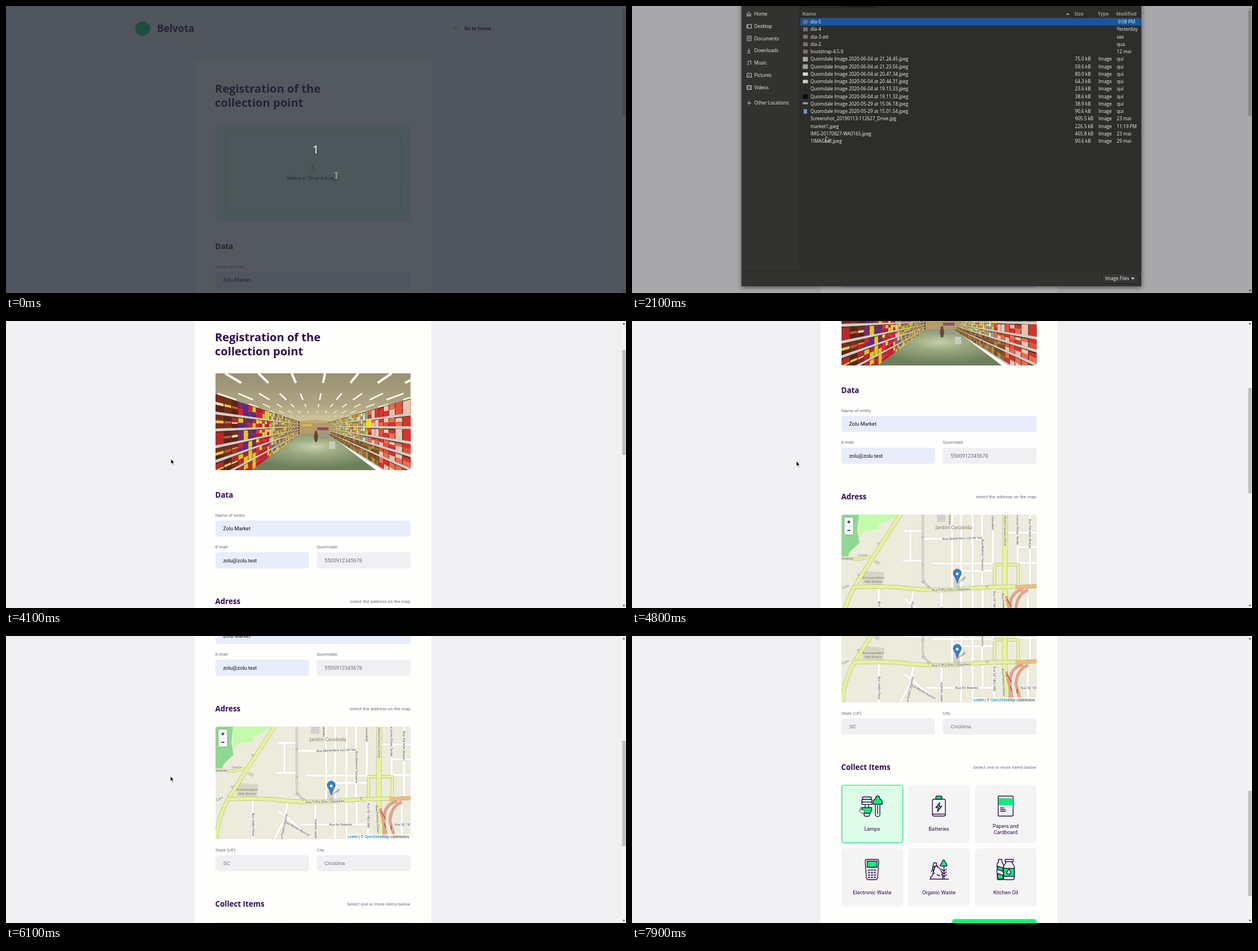
Animation of 1098x510 px, one loop 8000 ms. Source, as an HTML page:

```html
<!DOCTYPE html>
<html lang="en">
<head>
<meta charset="utf-8">
<title>Collection point form</title>
<style>
@property --y { syntax: '<integer>'; inherits: true; initial-value: 0; }
html, body { margin: 0; width: 100%; height: 100%; overflow: hidden; background: #f0f0f3; }
svg { display: block; }
#stage { position: absolute; left: 0; top: 0; animation: scroll 8s -5ms step-end infinite; }
#page { transform: translateY(calc(var(--y) * -1px)); }
#thumb { transform: translateY(calc(var(--y) * .366px)); }
#up { opacity: calc(.4 + var(--y) * .05); }
text { font-family: Roboto, sans-serif; white-space: pre; }
.h { font-family: 'Open Sans', sans-serif; font-weight: 700; fill: #300850; }
.b { font-weight: 700; fill: #300850; }
.i { fill: #300850; }
.k { fill: #111; }
.g { fill: #6c6c80; }
.a { font-family: 'Liberation Sans', Arial, sans-serif; fill: #6c6c80; }
.w { font-family: 'Open Sans', sans-serif; fill: #f2f2f0; }
.c { font-family: 'Open Sans', sans-serif; font-weight: 700; fill: #969692; }
.s { font-family: 'Noto Sans', sans-serif; fill: #333; stroke: #fff; stroke-width: 1; paint-order: stroke; }
.p { font-family: 'Noto Sans', sans-serif; fill: #77776f; }
.line { fill: none; stroke: #2c0d4e; stroke-width: 1.4; stroke-linejoin: round; stroke-linecap: round; }
.line .f { fill: #12ec78; }
.anim { animation: 8s -5ms step-end infinite; }
#veil { animation-name: veil; }
#dim { animation-name: dim; }
#dialog { animation-name: dialog; filter: drop-shadow(0 2px 4px rgba(0,0,0,.55)); }
#photo { animation-name: photo; }
#pick1 { animation-name: pick1; }
#pick2 { animation-name: pick2; }
#chosen { animation-name: chosen; }
#cursor { animation-name: move; }
#beam { animation-name: beam; }
#arrow { animation-name: arrow; }
#hand { animation-name: hand; }
@keyframes scroll {
  0% { --y: 0; }
  48.75% { --y: 24; }
  50% { --y: 88; }
  51.25% { --y: 118; }
  53.75% { --y: 118; animation-timing-function: steps(5); }
  60% { --y: 304; }
  62.5% { --y: 304; animation-timing-function: steps(6); }
  70% { --y: 486; }
  76.25% { --y: 487; animation-timing-function: steps(9); }
  87.5%, 100% { --y: 730; }
}
@keyframes veil { 0% { opacity: 1; } 1.25% { opacity: .5; } 2.5% { opacity: .2; } 3.75% { opacity: .05; } 5%, 100% { opacity: 0; } }
@keyframes dim {
  0% { opacity: 0; }
  11.25% { opacity: .075; animation-timing-function: steps(4); }
  16.25% { opacity: .3; }
  37.5% { opacity: .17; }
  38.75%, 100% { opacity: 0; }
}
@keyframes dialog { 0% { opacity: 0; } 11.25% { opacity: 1; } 37.5%, 100% { opacity: 0; } }
@keyframes photo { 0% { opacity: 0; } 37.5%, 100% { opacity: 1; } }
@keyframes pick1 { 0% { opacity: 1; } 31.25%, 100% { opacity: 0; } }
@keyframes pick2 { 0% { opacity: 0; } 31.25%, 100% { opacity: 1; } }
@keyframes chosen { 0% { opacity: 0; } 96.25%, 100% { opacity: 1; } }
@keyframes beam { 0% { opacity: 1; } 11.25%, 100% { opacity: 0; } }
@keyframes arrow { 0% { opacity: 0; } 11.25% { opacity: 1; } 93.75%, 100% { opacity: 0; } }
@keyframes hand { 0% { opacity: 0; } 93.75%, 100% { opacity: 1; } }
@keyframes move {
  0% { transform: translate(585px, 301px); }
  1.25% { transform: translate(585px, 301px); animation-timing-function: steps(3); }
  5% { transform: translate(567px, 298px); }
  11.25% { transform: translate(567px, 298px); animation-timing-function: steps(4); }
  16.25% { transform: translate(557px, 318px); }
  17.5% { transform: translate(557px, 318px); animation-timing-function: steps(5); }
  23.75% { transform: translate(343px, 241px); }
  25% { transform: translate(343px, 241px); animation-timing-function: steps(3); }
  28.75% { transform: translate(344.5px, 213px); }
  40% { transform: translate(344.5px, 213px); animation-timing-function: steps(5); }
  46.25% { transform: translate(292px, 245px); }
  53.75% { transform: translate(292px, 245px); animation-timing-function: steps(5); }
  60% { transform: translate(291px, 249px); }
  86.25% { transform: translate(291px, 249px); animation-timing-function: steps(2); }
  88.75% { transform: translate(265px, 268px); animation-timing-function: steps(4); }
  93.75% { transform: translate(395px, 312px); }
  95% { transform: translate(395px, 312px); animation-timing-function: steps(3); }
  98.75%, 100% { transform: translate(402px, 304px); }
}
</style>
</head>
<body>
<svg id="stage" width="1098" height="510" viewBox="0 0 1098 510"></svg>
<script>
const text = (s, x, y, size, cls, more = '') =>
  `<text x="${x}" y="${y + size * .355}" font-size="${size}" class="${cls}" ${more}>${s}</text>`;
const mid = 'text-anchor="middle"', end = 'text-anchor="end"';
const box = (x, y, w, h, fill, r = 0, more = '') =>
  `<rect x="${x}" y="${y}" width="${w}" height="${h}" rx="${r}" fill="${fill}" ${more}/>`;
const path = (d, more = '') => `<path d="${d}" ${more}/>`;
const stroke = (d, w, color) => path(d, `fill="none" stroke="${color}" stroke-width="${w}" stroke-linejoin="round"`);
const field = (label, value, x, y, w, fill, cls) =>
  text(label, x, y - 9.5, 8, 'g') + box(x, y, w, 28.7, fill, 4.6) + text(value, x + 13.7, y + 14.5, 9.15, cls);

let seed = 11;
const rnd = () => (seed = seed * 16807 % 2147483647) / 2147483647;
const pick = list => list[Math.floor(rnd() * list.length)];

// Store aisle: everything runs to one vanishing point
function photo() {
  const vx = 175, vy = 94, paths = {};
  const at = (x, y, a) => `${(vx + (x - vx) * a).toFixed(1)} ${(vy + (y - vy) * a).toFixed(1)}`;
  const quad = (x, y0, y1, a, b, color) =>
    paths[color] = (paths[color] || '') + `M${at(x, y0, a)}L${at(x, y0, b)}L${at(x, y1, b)}L${at(x, y1, a)}Z`;
  const shelves = (x, rows, palette) => {
    for (let r = 0; r < rows.length - 1; r++) {
      const top = rows[r], low = rows[r + 1] - 5, half = (top + low) / 2;
      quad(x, top, low, 1, .15, '#4a3526');
      for (let k = 0; k < 52; k++) {
        const a = 1 / (1 + k * .1), b = 1 / (1 + (k + .9) * .1);
        quad(x, top + 3 * rnd(), half, a, b, pick(palette(k, r)));
        quad(x, half, low, a, b, pick(palette(k, r)));
        quad(x, half - 2, half + 3, a, b, pick(['#f0dfae', '#e6c83c', '#c8543c']));
      }
      quad(x, low, rows[r + 1], 1, .15, '#cfcec6');
    }
  };
  shelves(0, [37, 73, 103, 133, 159, 190, 222], (k, r) =>
    k < 3 ? ['#5a2417', '#7a2d1c', '#b52a26'] :
    k < 7 ? (r < 4 ? ['#5b2a8c', '#7a2a6c', '#d4242f', '#e3c51f'] : ['#c9232c', '#e0c22a']) :
    k < 12 ? ['#d31f34', '#e52c3c', '#c11f2c', '#ecd33c'] : ['#a0aa48', '#e0c640', '#b8763c', '#8c6480', '#e2dcae']);
  shelves(346, [45, 75, 99, 126, 149, 174, 205], (k, r) =>
    r > 3 && k > 4 ? ['#7c5228', '#96683a', '#b58a3e'] :
    k < 8 ? ['#d8322c', '#e4503c', '#ef6a52', '#efc4ae'] : ['#d8c83e', '#78a8a0', '#e0833c', '#a9b84c', '#e6e0b4']);
  let lights = '';
  for (let x = -160; x < 520; x += 59)
    for (const [a, b] of [[1, .82], [.62, .5], [.42, .36], [.29, .25], [.2, .18]])
      lights += stroke(`M${at(x, 0, a)}L${at(x, 0, b)}`, 4.2 * a, '#fffdf2');
  return `<svg x="371" y="211" width="345.5" height="172">` +
    box(0, 0, 346, 112, 'url(#ceil)') + lights +
    path('M120 88L175 82L230 88V112H120Z', 'fill="#c2a873"') +
    Object.entries(paths).map(([c, d]) => path(d, `fill="${c}"`)).join('') +
    path('M64 172L150 108H200L284 172Z', 'fill="url(#floor)"') +
    box(150, 88, 54, 20, '#b69a6a') + box(153, 90, 17, 4, '#d8b84a') + box(180, 96, 20, 5, '#8a4c66') +
    box(186, 105, 15, 12, '#9a9a88') + box(201, 121, 11, 13, '#c8cbc0') +
    path('M176 104a2 2 0 1 1 4 0l2 9-2 9h-4l-2-9z', 'fill="#6b4536"') +
    box(267, 82, 9, 14, '#e8e02a') + '</svg>';
}

function map() {
  const road = (d, w = 6, color = '#e6f29c') => stroke(d, w + 1.4, '#b5bd86') + stroke(d, w, color);
  const minor = 'M122 28V72M109 29H144M109 82H144M122 72V82M144 43H250M196 0V130M212 0V130M232 0V128M249 0V128M268 0V92' +
    'M312 0V92M334 0V126M160 87H270M196 100H270M313 58H346M313 86H346M290 32H346M66 132V200M128 132L122 165L104 200' +
    'M112 150L168 196M177 134V200M150 174H270M212 134V200M232 134V200M270 128V200M330 140V200M250 134V174M316 174H346';
  const streets = [
    ['Rua Abelardino Luís de Vaz', 214, 42, -2], ['Rua Trilha Dois Coqueirais', 194, 133, -2], ['Rua Ari Bolento', 222, 174, 0],
    ['Rua SD 187', 332, 174, 0], ['Rua Belmiro Tavozino', 250, 72, 90], ['r Otávio Fausto Lemar', 290, 27, 90],
    ['e Jonas Eliseu Tardel', 312, 27, 90], ['Rua Florindo Maseti', 334, 34, 90], ['ndrades', 192, 8, 90],
    ['Ostenfeld', 268, 14, 90], ['Rua Valdo Pena', 67, 174, 90], ['Rua SD 1802-086', 271, 158, 90],
    ['Rua Prefeito Olavo', 287, 164, 87], ['ua Padre Leontino', 121, 178, -78], ['Rua Monte Alvorim', 145, 181, 30],
    ['ardolin Vasetto', 177, 184, -90], ['oloneses', 10, 78, 0]];
  const squares = [[66, 51], [30, 107], [144, 41], [144, 90], [144, 120], [155, 130], [207, 129], [258, 128], [331, 127]];
  return `<svg x="371" y="648" width="345.5" height="200"><g clip-path="url(#round)">` +
    box(0, 0, 346, 200, '#ecebdc') +
    path('M30 0H106L80 12L66 18V26L40 30L31 42Z', 'fill="#c3fbab"') +
    path('M0 0H31L28 28L32 50L15 66L12 74H0Z', 'fill="#8ed992"') +
    box(169, 0, 15, 13, '#d3d0cd') + path('M41 100L76 103L73 126L36 123Z', 'fill="#d9d5c5"') +
    path('M60 80l9 5-4 5-8-5z', 'fill="#d3cfc4"') + box(196, 114, 13, 15, '#d5d2cd') +
    stroke(minor, 4.4, '#d8d6ca') + stroke(minor, 3.6, '#fff') +
    stroke('M144 0V112Q145 122 158 131', 3, '#999') + stroke('M144 0V112Q145 122 158 131', 1.6, '#eee') +
    road('M271 130V89H313V127', 4) +
    road('M290 0L289 130L293 200', 8) +
    road('M0 78L34 79L52 74', 4) +
    road('M106 -2L66 60L24 126Q4 160 1 202') +
    road('M22 129Q55 127 100 129Q150 136 200 133L260 129L310 128') +
    road('M308 129L346 127', 6, '#f7b97c') +
    ['M322 133Q303 136 299 156L298 200', 'M330 134Q310 142 309 168L318 200', 'M292 145L304 200'].map(d => road(d, 4, '#f39a8c')).join('') +
    stroke('M293 150l8 14M299 172l3 8M311 176v8', 1, '#7a2a26') +
    squares.map(([x, y]) => box(x - 1.4, y - 1.4, 2.8, 2.8, '#eee', 0, 'stroke="#888" stroke-width=".6"')).join('') +
    text('Jardim Coralinda', 199, 23, 8.3, 'p', mid) + text('Ceará', 37, 72, 6, 'p', mid) +
    text('Caio', 7, 128, 6, 'p', mid + ' transform="rotate(-25 7 128)"') +
    text('Armazenadora', 56, 112, 5.8, 'p', mid + ' font-style="italic"') +
    text('Vale Branco', 56, 119, 5.8, 'p', mid + ' font-style="italic"') +
    streets.map(([s, x, y, r]) => text(s, x, y, 5.6, 's', `${mid} transform="rotate(${r} ${x} ${y})"`)).join('') +
    path('M205 122l13-12q5 1-1 6z', 'fill="#000" opacity=".25"') +
    path('M205 122Q203 114 199 108A7.2 7.2 0 1 1 211 108Q207 114 205 122Z', 'fill="#3580c8" stroke="#2a639f" stroke-width=".8"') +
    '<circle cx="205" cy="105.5" r="2.4" fill="#fff"/>' +
    box(5, 5, 16, 31, '#fff', 2.5, 'stroke="#000" stroke-opacity=".25"') + stroke('M5.5 20.5H20.5', .7, '#ccc') +
    stroke('M10.2 13H15.8M13 10.2V15.8M10.2 28H15.8', 1.3, '#111') +
    box(232, 191, 114, 9, '#fff', 0, 'opacity=".75"') +
    text('<tspan fill="#0078a8">Leaflet</tspan> | © <tspan fill="#0078a8">OpenStreetMap</tspan> contributors', 343, 195.5, 6.3, 'a', end + ' style="fill:#333"') +
    '</g></svg>';
}

function items() {
  const names = ['Lamps', 'Batteries', 'Papers and|Cardboard', 'Electronic Waste', 'Organic Waste', 'Kitchen Oil'];
  const cards = names.map((n, i) => {
    const x = 371 + i % 3 * 118.2, y = 265 + Math.floor(i / 3) * 112.4, lines = n.split('|');
    return box(x, y, 109, 103, '#f4f4f5', 4.6) +
      (i ? '' : `<g id="chosen" class="anim">${box(x + .6, y + .1, 108, 102.4, '#dffce9', 4.6, 'stroke="#2bdc86" stroke-width="1.4"')}</g>`) +
      lines.map((s, j) => text(s, x + 54.3, y + 78 + (j - (lines.length - 1) / 2) * 11, 9.15, 'i', mid)).join('');
  });
  let keys = '';
  for (let k = 0; k < 12; k++) keys += `M${418.5 + k % 3 * 5.3} ${415.5 + Math.floor(k / 3) * 4.3}h2.6v1.3h-2.6z`;
  const icons =
    // lamps
    path('M410 286h12a2 2 0 0 1 0 4.2h-12a2 2 0 0 1 0-4.2zM409 290.5h14a2 2 0 0 1 0 4.4h-14a2 2 0 0 1 0-4.4zM409 295h14a2 2 0 0 1 0 4.4h-14a2 2 0 0 1 0-4.4zM413 300v5M419 300v5M411 315v3l2 2.5h6l2-2.5v-3') +
    path('M407 305h17.5v5l-3 5h-11l-3.5-5z', 'class="f"') +
    path('M431 299v18a4 4 0 0 0 8 0v-18M435 301v15') +
    path('M427 299v-3q0-5 4-6l.8-4q3.300-3.500 6.600 0l.8 4q4 1 4 6v3z', 'class="f"') +
    // battery
    path('M538 290v-3q0-2.500 2.500-2.500h6q2.500 0 2.500 2.500v3z', 'class="f"') +
    path('M535 290h17q3 0 3 3v24q0 3-3 3h-17q-3 0-3-3v-24q0-3 3-3zM532 316.5h23') +
    path('M545 296l-7 9h4.5l-1.5 7 7.5-9.500h-4.500z', 'class="f"') +
    // paper
    path('M651 284.5h22q2 0 2 2v31q0 2.500-2.500 2.500h-22q-2 0-2-2v-31q0-2.500 .5-2.500z') + path('M649 288h26v13h-26z', 'class="f" stroke="none"') +
    path('M652.5 305.5h6M652.5 308.5h9M652.5 311.5h9') +
    // handset
    path('M416 397h18q3 0 3 4l-2 28q0 4-4 4h-12q-4 0-4-4l-2-28q0-4 3-4z') + path('M416.5 400h17.5v11h-17.5z', 'class="f"') + path(keys, 'stroke-width="1"') +
    // scraps and tree
    path('M527.5 432h33M529 432v-4q4-1 4-6l1-8q1-5 5-5l6 4 4 7 1 12M535 404q-3 3-2 10l-3 5M534 403h5v4l3 4M532 424l4-3M540 424l5 2M552.5 409v23M548 414l4.5 4 4.5-4M548 419l4.5 4 4.5-4M548 424l4.5 4 4.5-4') +
    path('M546 407l4-7q2-4 4 0l4 7q0 2-2 2h-8q-2 0-2-2z', 'class="f"') + path('M532 413q2-4 5-4l-3 10z', 'class="f"') +
    // bottles
    path('M649 397h6v5q4 4 3 9l-1 6 1 6v8q0 2-2 2h-7q-2 0-2-2v-7l-1-6 1-6q-2-8 2-10z') + path('M647 409l10 3v6l-10-3zM647 422l10 3v7h-9z', 'class="f"') +
    path('M661 397h14v4h-14zM662 401q0 4-3 6-1 1-1 3v20q0 3 3 3h13q3 0 3-3v-20q0-2-1-3-3-2-3-6') + path('M658 413h19v14h-19z', 'class="f"') +
    path('M667.5 414.5q7 8 0 9q-7-1 0-9z', 'fill="#fff"');
  return `<g transform="translate(0 730)">${cards.join('')}<g class="line">${icons}</g>${box(567, 503, 149.5, 32, '#10f876', 4.6)}</g>`;
}

const page = () => box(0, 0, 1098, 1320, '#f0f0f3') +
  '<circle cx="242" cy="40" r="13" fill="#12cc6c"/>' + text('Belvota', 267.5, 40, 17.4, 'h') +
  stroke('M801 40H794.5M797.5 36.8L794.3 40L797.5 43.2', 1, '#34cb79') + text('Go to home', 811.5, 40, 9.15, 'b') +
  box(334, 98, 419, 1240, '#fefffd', 4.6) +
  text('Registration of the', 370, 147, 20.1, 'h') + text('collection point', 370, 171.5, 20.1, 'h') +
  box(371, 211, 345.5, 172, '#d8fae2', 5.7) +
  box(388, 228, 311, 137, 'none', 5.7, 'stroke="#4ecb79" stroke-width=".7" stroke-dasharray="2 1.5"') +
  stroke('M538.5 289.5v4.5h9.8v-4.5M543.4 291v-7M540.5 286.5l2.9-2.9 2.9 2.9', .9, '#34b868') +
  text('Select or Drop a Image', 543.5, 306, 9.15, '', mid + ' fill="#333"') +
  `<g id="photo" class="anim">${box(371, 211, 345.5, 172, '#fefffd')}${photo()}</g>` +
  text('Data', 370.5, 427, 13.4, 'h') +
  field('Name of entity', 'Zolu Market', 370.7, 472.5, 345.7, '#e8ecfd', 'k') +
  field('E-mail', 'zolu@zolu.test', 370.7, 529, 166, '#e8ecfd', 'k') +
  field('Quomdale', '5500912345678', 550.3, 529, 166, '#f0f0f3', 'g') +
  text('Adress', 370.5, 616, 13.4, 'h') + text('select the address on the map', 716, 616.5, 8, 'g', end) + map() +
  field('State (UF)', 'SC', 370.7, 876.5, 166, '#f0f0f3', 'a') +
  field('City', 'Criciúma', 550.3, 876.5, 166, '#f0f0f3', 'a') +
  text('Collect Items', 370.5, 963, 13.4, 'h') + text('Select one or more items below', 716, 963.5, 8, 'g', end) + items();

function dialog() {
  const places = ['Home', 'Desktop', 'Documents', 'Downloads', 'Music', 'Pictures', 'Videos'];
  const glyphs = ['M203 15l4-4.5 4 4.5M204 14v4h2v-3h2v3h2v-4', 'M203.5 11h8v6.5h-8zM205 11v6.5', 'M204 10h7v8h-7zM206 13h3M206 15h3', 'M207 10v6M204.5 13.5l2.5 2.5 2.5-2.5M204 18h6',
    'M205.5 17v-6l5-1v6M204 17h1.5M209 16h1.5', 'M203.5 10.5h8v7h-8zM205 16l2-3 3 3', 'M203.5 10.5h8v7h-8zM205.5 10.5v7M209.5 10.5v7'];
  const shot = n => `Quomdale Image 2020-${n}.jpeg`;
  const rows = [['dia-5', '', '9:08 PM'], ['dia-4', '', 'Yesterday'], ['dia-3-att', '', 'sex'], ['dia-2', '', 'qua'], ['bootstrap-4.5.0', '', '12 mai'],
    [shot('06-04 at 21.24.45'), '75.0', 'qui', '#aaa9a4'], [shot('06-04 at 21.23.56'), '59.6', 'qui', '#a3a29d'], [shot('06-04 at 20.47.34'), '80.0', 'qui', '#d9d4c6'],
    [shot('06-04 at 20.44.31'), '64.3', 'qui', '#d3c9bd'], [shot('06-04 at 19.13.33'), '23.6', 'qui', '#2a2a2c'], [shot('06-04 at 19.11.32'), '38.6', 'qui', '#0c0c0d'],
    [shot('05-29 at 15.06.18'), '38.9', 'qui', '#8fa0b5'], [shot('05-29 at 15.01.54'), '90.6', 'qui', '#6f93cf'], ['Screenshot_20190113-112627_Drive.jpg', '905.5', '23 mai'],
    ['market1.jpeg', '226.5', '11:19 PM'], ['IMG-20170827-WA0165.jpeg', '465.8', '23 mai'], ['1IMAGEM.jpeg', '90.6', '29 mai']];
  const rowY = i => 28.2 + i * 13.26;
  const bar = (id, i) => `<g id="${id}" class="anim">${box(298, rowY(i) - 6.8, 603.5, 13.5, '#19559b')}</g>`;
  return box(194, -20, 708, 518, '#323230') + box(298, -20, 603.5, 491, '#2d2d2b') +
    stroke('M297.5 0V470.5M194 470.5H902', 1, '#232321') + stroke('M194 158.5H297', .6, '#2b2b29') +
    box(301.5, -10, 140, 12.2, '#343432', 3, 'stroke="#1b1b1a"') + box(371, -10, 59, 12, '#20201f') +
    places.map((s, i) => text(s, 216.5, 14 + i * 21.83, 8.2, 'w')).join('') + text('Other Locations', 216.5, 172, 8.2, 'w') +
    glyphs.map((d, i) => `<g transform="translate(0 ${i * 21.83})">${stroke(d, .9, '#d8d8d5')}</g>`).join('') +
    stroke('M204 172.3h7M207.5 168.8v7', .9, '#d8d8d5') +
    [['Name', 301.5], ['Size', 783.5], ['Type', 825], ['Modified', 857.5]].map(([s, x]) => text(s, x, 14, 8.2, 'c')).join('') +
    path('M768.5 15.8h6l-3-3.500z', 'fill="#a5a5a1"') + bar('pick1', 0) + bar('pick2', 14) +
    rows.map(([name, size, when, thumb], i) => {
      const y = rowY(i), h = i > 6 && i < 9 || i === 11 ? 6 : 8;
      const icon = i < 5 ? box(303, y - 3.5, 8.5, 7, '#716b68', 1) + box(303, y - 3.5, 4, 1.8, '#a5564c') + box(305, y, 4.5, 1, '#8f8a86') :
        thumb ? box(i === 12 ? 304 : 302.5, y - h / 2, i === 12 ? 6 : 9, i === 11 ? 3.5 : h, thumb) : '';
      return icon + text(name, 316, y, 8.2, 'w') + (size ? text(size + ' kB', 784.5, y, 8.2, 'w') + text('Image', 826, y, 8.2, 'w') : '') +
        text(when, i ? 858.5 : 860.5, y, 8.2, 'w');
    }).join('') +
    box(832.5, 475, 64, 18, '#363634', 3, 'stroke="#1e1e1d"') + text('Image Files', 838, 484, 8.2, 'w') + path('M884 482.8h6l-3 3.5z', 'fill="#eee"');
}

document.getElementById('stage').innerHTML = `
<defs>
  <linearGradient id="ceil" x2="0" y2="1"><stop stop-color="#9a9072"/><stop offset=".5" stop-color="#b0a583"/><stop offset=".85" stop-color="#dcd2a6"/></linearGradient>
  <radialGradient id="floor" cx=".5" cy=".35" r=".6"><stop stop-color="#c9d0ae"/><stop offset=".35" stop-color="#9dab82"/><stop offset="1" stop-color="#6d7f5c"/></radialGradient>
  <clipPath id="round"><rect width="345.5" height="200" rx="4.6"/></clipPath>
</defs>
<g id="page">${page()}</g>
${box(1091, 0, 7, 510, '#f3f3f4')}
<g id="thumb">${box(1091.3, 8, 6.2, 187, '#bfbfc1')}</g>
${path('M1092 6h4.5l-2.25-3z', 'id="up" fill="#4a4a4c"')}${path('M1092 504.5h4.5l-2.25 3z', 'fill="#4a4a4c"')}
<g id="dim" class="anim">${box(0, 0, 1098, 510, '#000')}</g>
<g id="dialog" class="anim">${dialog()}</g>
<g id="veil" class="anim">${box(0, 0, 1098, 510, '#252a33', 0, 'opacity=".78"')}${text('1', 548.5, 255, 20, '', mid + ' fill="#fff" style="font-family:\'Open Sans\',sans-serif"')}</g>
<g id="cursor" class="anim">
  <g id="beam" class="anim">${stroke('M-2.5-5H2.5M-2.5 5H2.5M0-5V5', 2.2, '#d4d4d6') + stroke('M-2-5H2M-2 5H2M0-5V5', .8, '#333')}</g>
  <g id="arrow" class="anim">${path('M0 0V9.3L2.2 7.3L3.8 10.8L5.3 10.1L3.8 6.8H6.7Z', 'fill="#111" stroke="#fff" stroke-width=".8"')}</g>
  <g id="hand" class="anim">${path('M2.5 1q1.5-1.5 2 .3v3.4l4.5 1q1 .3 .8 1.5l-.8 3.3H4L0 6.5q0-1.5 2.5-.3z', 'fill="#fff" stroke="#222" stroke-width=".8"')}</g>
</g>`;
</script>
</body>
</html>
```
